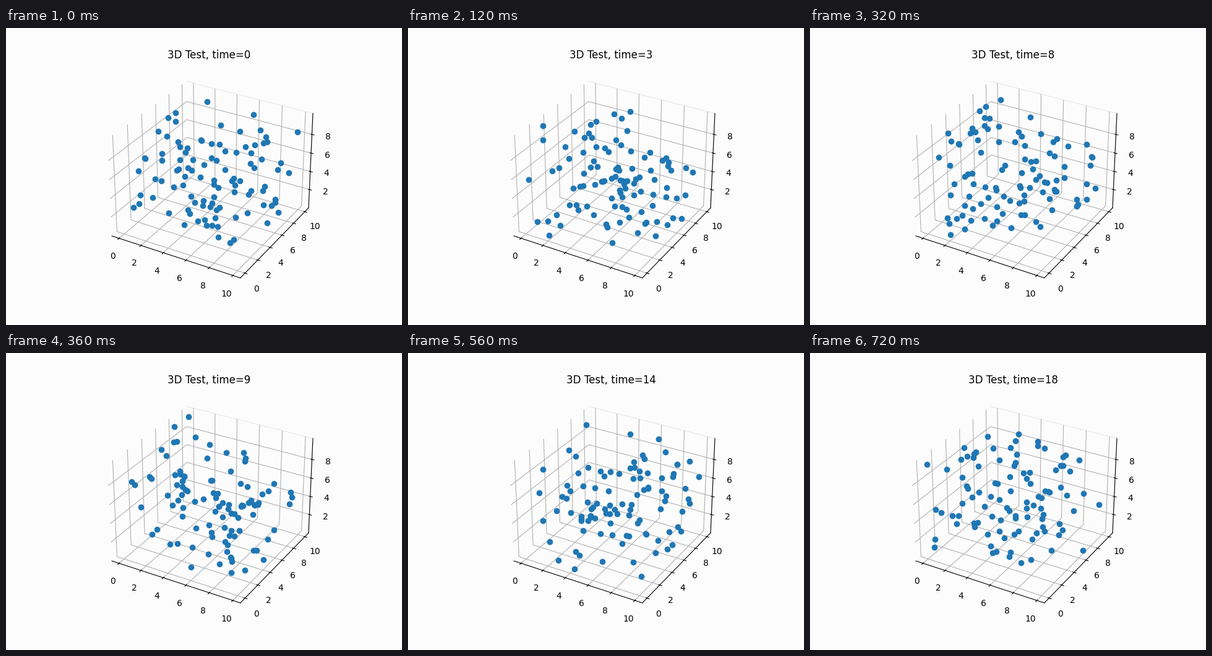
A matplotlib script that plays this animation: 640 px wide and 480 px high, repeating every 760 ms.

```python
import matplotlib.pyplot as plt
import numpy as np
from matplotlib.animation import FuncAnimation

FRAMES = 19
STEP_MS = 40
POINTS = 100
BACK = "#fcfcfc"
PANE_EDGE = "#ebebeb"

# One fresh uniform cloud per time step
rng = np.random.default_rng(19)
clouds = rng.random((FRAMES, 3, POINTS)) * 10

fig = plt.figure(figsize=(6.4, 4.8), dpi=100, facecolor=BACK)
ax = fig.add_subplot(projection="3d", facecolor=BACK)
title = ax.set_title("3D Test")
dots, = ax.plot(*clouds[0], linestyle="", marker="o", color="#1f77b4")

for axis in (ax.xaxis, ax.yaxis, ax.zaxis):
    axis.set_pane_color(BACK)
ax.yaxis.pane.set_edgecolor(PANE_EDGE)

ax.set_xticks(range(0, 11, 2))
ax.set_yticks(range(0, 11, 2))
ax.set_zticks(range(2, 9, 2))
ax.set_xlim(-0.663, 10.627, view_margin=0)
ax.set_ylim(-0.715, 10.685, view_margin=0)
ax.set_zlim(-0.062, 10.203, view_margin=0)


def update(step):
    dots.set_data_3d(*clouds[step])
    title.set_text(f"3D Test, time={step}")
    return dots, title


anim = FuncAnimation(fig, update, frames=FRAMES, interval=STEP_MS,
                     repeat=True, repeat_delay=0, blit=False)
plt.show()
```
